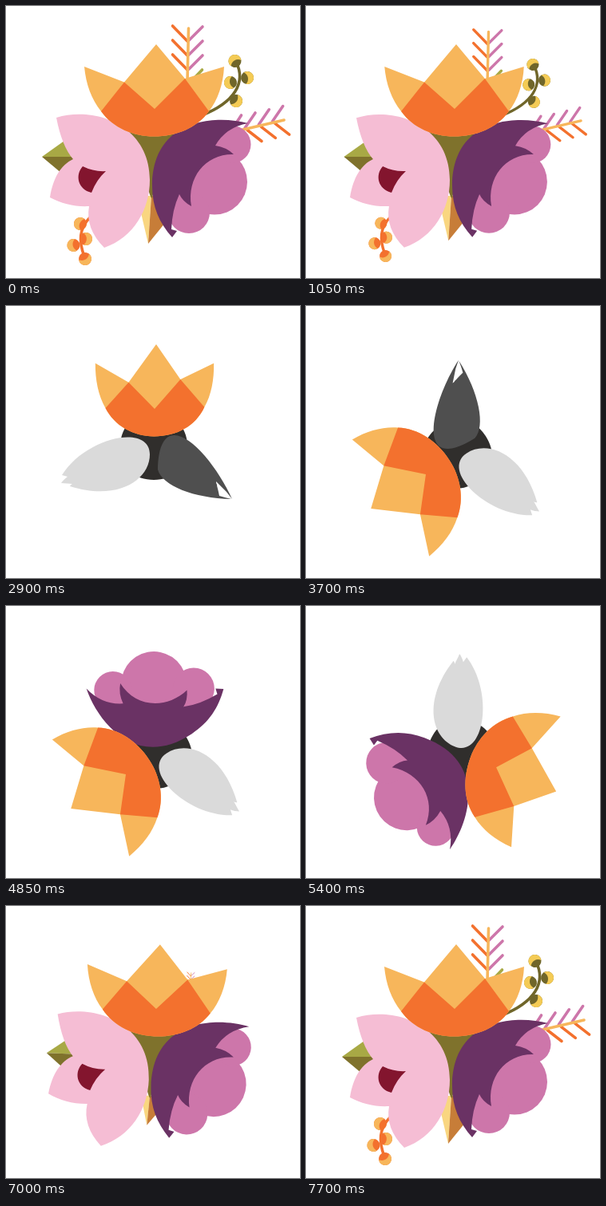
An HTML page for the animation above (7.8 s loop, 368 by 341 pixels).

```html
<!DOCTYPE html>
<html lang="en">
<head>
<meta charset="utf-8">
<title>Bouquet</title>
<style>
  html, body { margin: 0; width: 100%; height: 100%; overflow: hidden; background: #fff; }
  svg { display: block; width: 368px; height: 341px; }
  .line { fill: none; stroke-width: 3.6; stroke-linecap: round; }
</style>
</head>
<body>
<svg viewBox="0 0 368 341">
  <g id="bouquet">
    <g id="extras"></g>
    <path id="base"/>
    <g id="flowers"></g>
  </g>
</svg>
<script>
const NS = 'http://www.w3.org/2000/svg';
const LOOP = 7800, STEP = 50;
const PIVOT = [186.7, 183.6];
const ORANGE = '#f3712e', GOLD = '#f7b65b', ROSE = '#cd76aa', OLIVE = '#7f722c', LEAF = '#a8a945';

const $ = id => document.getElementById(id);
function add(parent, tag, attrs = {}) {
  const el = document.createElementNS(NS, tag);
  for (const key in attrs) el.setAttribute(key, attrs[key]);
  return parent.appendChild(el);
}

const clamp = x => Math.max(0, Math.min(1, x));
const span = (t, from, to) => clamp((t - from) / (to - from));
const lerp = (a, b, k) => a + (b - a) * k;
const inOut = p => p < .5 ? 4 * p ** 3 : 1 - 4 * (1 - p) ** 3;
const sineOut = p => Math.sin(p * Math.PI / 2);
const backOut = p => 1 + 2 * (p - 1) ** 3 + (p - 1) ** 2;

// Blends the numbers of two paths with the same commands.
function mixPath(a, b, k) {
  const nums = b.match(/-?[\d.]+/g);
  let i = 0;
  return a.replace(/-?[\d.]+/g, n => lerp(+n, +nums[i++], k).toFixed(2));
}
function mixColor(a, b, k) {
  const part = (c, i) => parseInt(c.slice(i, i + 2), 16);
  return `rgb(${[1, 3, 5].map(i => Math.round(lerp(part(a, i), part(b, i), k)))})`;
}

// Each layer: [closed path, open path, closed colour, open colour]
const flowers = [
  {
    axis: 123.4, foot: [191, 203], start: 4100,
    lobes: [[258, 219, 5, 261, 220.5, 41], [252, 214, 5, 283, 173.5, 23.5], [240, 225, 5, 229, 259, 26]],
    layers: [[
      'M283 242C258 185 192 115 190 205C195 225 235 241 282 242L274 240L267 238Q266 233 265 229Q264 226 264 224C263 222 263 221 263 220Q265 222 268 225Q276 232 283 242Z',
      'M303 147C260 136 183 142 183 226C183 252 192 272 208 290L214 282L207 280Q208 255 217 236Q221 245 232 251C226 215 250 185 285 186Q276 177 262 175Q275 152 303 147Z',
      '#4f4f4f', '#6a3264']]
  },
  {
    axis: 249.4, foot: [178, 195], start: 5650,
    layers: [[
      'M70 212C100 164 180 147 180 186C180 218 140 245 80 226Q81 224 83 223Q84 223 83 223C79 223 74 222 69 222C71 219 74 216 77 214Q74 213 70 212Z',
      'M63 140C112 125 180 150 180 218C180 255 160 290 123 303Q99 279 104 251Q104 251 104 251C87 252 70 248 55 240C59 215 69 199 84 192Q70 176 63 140Z',
      '#dadada', '#f5bdd4'
    ], [
      'M112 200Q112 200 112 200Q112 200 112 200C112 200 112 200 112 200Z',
      'M96 201Q110 208 125 207Q113 218 107 234C90 230 86 212 96 201Z',
      '#dadada', '#83152e']]
  },
  {
    axis: 0, foot: [185, 163], start: 2550,
    layers: [[
      'M186 49L183 97L188 48L188 97L191 49C200 60 213 82 218 99C227 140 216 163 186 163C155 163 145 135 154 107C160 84 174 60 186 49Z',
      'M98 76L148 95.5L188 48L224 91L273 76C272 98 265 118 254 132C239 153 213 163.5 185 163.5C160 163.5 134 153 119 132C107 117 100 98 98 76Z',
      '#aaa7a2', GOLD
    ], [
      'M154 107L183 97L186 129L188 97L218 99C227 140 216 163 186 163C155 163 145 135 154 107Z',
      'M119 132L148 95.5L186 129L224 91L254 132C239 153 213 163.5 185 163.5C160 163.5 134 153 119 132Z',
      '#928f8d', ORANGE]]
  }
];

for (const f of flowers) {
  f.el = add($('flowers'), 'g');
  f.dots = (f.lobes || []).map(() => add(f.el, 'circle'));
  f.paths = f.layers.map(() => add(f.el, 'path'));
}

// Sprigs behind the flowers
const extras = [];
function extra(x, y) {
  const el = add($('extras'), 'g');
  extras.push({ el, x, y });
  return el;
}
const line = (g, d, stroke) => add(g, 'path', { d, stroke, class: 'line' });
const shape = (g, d, fill) => add(g, 'path', { d, fill });
function berry(g, x, y, turn, dark, light) {
  const b = add(g, 'g', { transform: `translate(${x} ${y}) rotate(${turn})` });
  add(b, 'circle', { r: 8, fill: dark });
  shape(b, 'M3-7.4A8 8 0 1 0 3 7.4A9 9 0 0 1 3-7.4Z', light);
}

const leaf = extra(85, 190);
shape(leaf, 'M45 189L73 169L90 189Z', LEAF);
shape(leaf, 'M45 189H90L70 210Z', OLIVE);

const bud = extra(182, 238);
shape(bud, 'M164 238H182L178 298Z', '#f9d680');
shape(bud, 'M182 238L178 298L199 272L192 238Z', '#c77d38');

const plume = extra(228, 100);
for (let i = 0; i < 3; i++) {
  const y = 25 + i * 18;
  line(plume, `M208.500 ${y}L227 ${y + 19}`, ORANGE);
  line(plume, `M246 ${y + 1}L229 ${y + 18}`, ROSE);
}
line(plume, 'M245.500 80L236 90', LEAF);
line(plume, 'M228.500 28L227 95', GOLD);

const twig = extra(245, 140);
line(twig, 'M245 137C286 121 301 96 288 70', '#70662a');
[[286.5, 69, 60], [302, 90, 170], [281, 96, -10], [288, 119, 215]]
  .forEach(([x, y, a]) => berry(twig, x, y, a, '#70662a', '#f4cb55'));

const stalk = extra(108, 262);
line(stalk, 'M106 264C91 279 91 295 98 314', ORANGE);
[[93, 273, 20], [84.5, 300, -10], [100, 292, 180], [99, 317, 240]]
  .forEach(([x, y, a]) => berry(stalk, x, y, a, ORANGE, GOLD));

const quill = extra(285, 157);
for (let i = 0; i < 3; i++) {
  const x = 17.3 * i, y = -4.2 * i;
  line(quill, `M${312 + x} ${134 + y}L${299 + x} ${153 + y}`, ROSE);
  line(quill, `M${302 + x} ${155.5 + y}L${320 + x} ${169.5 + y}`, ORANGE);
}
line(quill, 'M294.500 137L286 150', ROSE);
line(quill, 'M290 156.500L348 143', GOLD);

function drawFlower(f, t) {
  const k = t < 1550 ? 1 - inOut(span(t, 1000, 1550))
                     : sineOut(span(t, f.start + 50, f.start + 520));
  const tint = clamp(k * 1.5);
  const rise = Math.sin(Math.PI * span(t, f.start, f.start + 340));
  const pulse = 1 - .04 * Math.sin(Math.PI * span(t, 1700, 2550)) ** 2;
  const [x, y] = f.foot;
  f.el.setAttribute('transform',
    `translate(${x} ${y}) rotate(${f.axis}) scale(${pulse * (1 - .12 * rise)} ${pulse * (1 + .4 * rise)}) rotate(${-f.axis}) translate(${-x} ${-y})`);
  f.layers.forEach(([d0, d1, c0, c1], i) => {
    f.paths[i].setAttribute('d', mixPath(d0, d1, k));
    f.paths[i].setAttribute('fill', mixColor(c0, c1, tint));
  });
  f.dots.forEach((dot, i) => {
    const l = f.lobes[i];
    ['cx', 'cy', 'r'].forEach((key, j) => dot.setAttribute(key, lerp(l[j], l[j + 3], k)));
    dot.setAttribute('fill', mixColor('#4f4f4f', ROSE, tint));
  });
  return k;
}

function draw(t) {
  const [a, b, c] = [[3100, 3600], [4850, 5350], [6550, 7090]].map(w => inOut(span(t, ...w)));
  const turn = -123.4 * a - 126 * b - 110.6 * c;
  const shift = a - b;
  $('bouquet').setAttribute('transform',
    `translate(${8.5 * shift} ${-3.2 * shift}) rotate(${turn} ${PIVOT})`);

  const open = flowers.map(f => drawFlower(f, t));
  const full = open[1];
  // A disc that stretches into the wedge between the open flowers
  $('base').setAttribute('d', mixPath(
    'M143 176C143 120 227 120 227 176C227 204 208 218 185 218C162 218 143 204 143 176Z',
    'M148 155C165 140 205 140 222 155C210 175 190 205 183 241C178 241 170 180 148 155Z', full));
  $('base').setAttribute('fill', mixColor('#302e2c', OLIVE, full));

  extras.forEach(({ el, x, y }, i) => {
    const begin = 6850 + i * 60;
    const s = t < 1550 ? 1 - inOut(span(t, 950, 1350)) : backOut(span(t, begin, begin + 450));
    const size = t <= 950 ? 1 : t > 1550 && t < begin ? 0 : Math.max(0, s);
    el.setAttribute('transform', `translate(${x} ${y}) scale(${size}) translate(${-x} ${-y})`);
    el.setAttribute('visibility', size < .01 ? 'hidden' : 'visible');
  });
}

const origin = performance.now();
function tick() {
  const t = Math.max(0, performance.now() - origin) % LOOP;
  draw(t < 1000 ? 0 : Math.floor(t / STEP) * STEP);
  requestAnimationFrame(tick);
}
tick();
</script>
</body>
</html>
```
